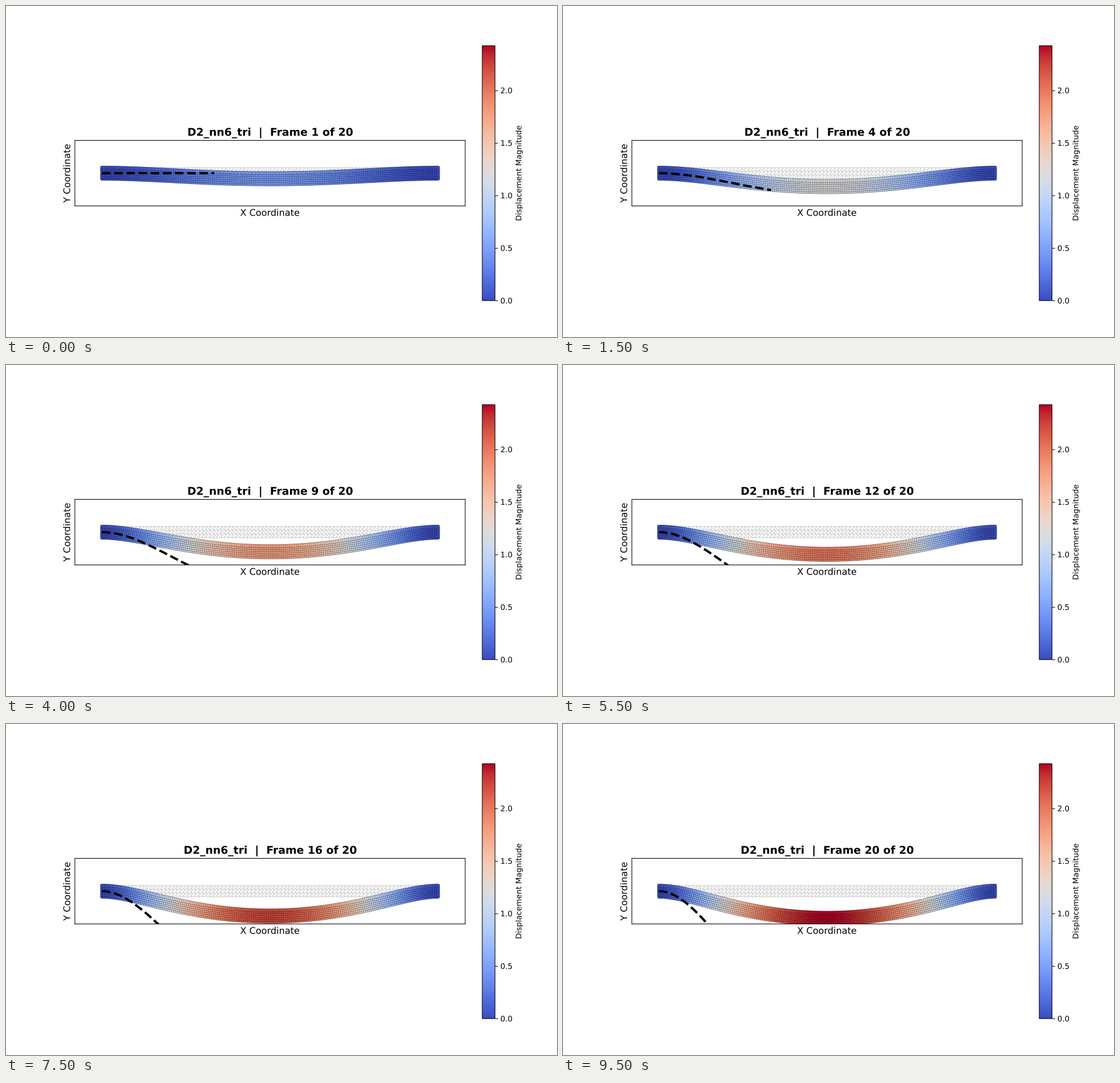
Recreate the animation shown at these times as a matplotlib script. Size 966 by 580 pixels, loop 10000 ms.

```python
import numpy as np
import matplotlib.pyplot as plt
from matplotlib.animation import FuncAnimation
from matplotlib.patheffects import Normal
from matplotlib.text import Text

# Unsnapped lines keep their fractional pixel positions.
plt.rcParams.update({"font.family": "DejaVu Sans", "path.snap": False})

WIDTH, HEIGHT, DPI = 966, 580, 96.6
STEPS, INTERVAL = 20, 500
LENGTH, DEPTH = 30.0, 1.0
CELLS_X, CELLS_Y = 90, 3
MAX_DISP = 2.425


def mid_deflection(step):
    """Mid-span deflection of a stiffening beam: w + a w^3 grows with load."""
    w = np.linspace(0, 3, 3001)
    load = w + 0.644 * w**3
    full = MAX_DISP + 0.644 * MAX_DISP**3
    return np.interp(full * step / STEPS, load, w)


def beam_shape(s, tension):
    """Clamped beam under uniform load and axial tension: value and slope."""
    def raw(p):
        bend = np.cosh(tension / 2) - np.cosh(tension * (p - 0.5))
        return p * (1 - p) / 2 - bend / (2 * tension * np.sinh(tension / 2))

    slope = 0.5 - s + np.sinh(tension * (s - 0.5)) / (2 * np.sinh(tension / 2))
    peak = raw(0.5)
    return raw(s) / peak, slope / peak


def displacement(step):
    w_mid = mid_deflection(step)
    columns = node_x[0]
    shape, slope = beam_shape(columns / LENGTH, 5.5 * w_mid)
    angle = w_mid * slope / LENGTH
    # Uniform stretch along the beam makes steep parts slide towards the ends.
    shortening = angle**2 / 2
    slide = np.cumsum(shortening.mean() - shortening) * columns[1]
    dx = slide + (node_y - DEPTH / 2) * angle
    dy = np.broadcast_to(-w_mid * shape, dx.shape)
    return dx, dy


def linear_curve(step):
    s = line_x / LENGTH
    return DEPTH / 2 - 0.633 * step * 16 * s**2 * (1 - s)**2


def cell_triangles():
    i, j = np.meshgrid(np.arange(CELLS_X), np.arange(CELLS_Y))
    low = (j * (CELLS_X + 1) + i).ravel()
    high = low + CELLS_X + 1
    return np.vstack([np.column_stack([low, low + 1, high]),
                      np.column_stack([low + 1, high + 1, high])])


def grid(nx, ny):
    return np.meshgrid(np.linspace(0, LENGTH, nx), np.linspace(0, DEPTH, ny))


node_x, node_y = grid(2 * CELLS_X + 1, 2 * CELLS_Y + 1)
corner_x, corner_y = grid(CELLS_X + 1, CELLS_Y + 1)
line_x = np.linspace(0, 10, 100)

fig, ax = plt.subplots(
    figsize=((WIDTH + 0.01) / DPI, (HEIGHT + 0.01) / DPI), dpi=DPI)
ax.triplot(corner_x.ravel(), corner_y.ravel(), cell_triangles(),
           color="lightgray", linewidth=0.8, zorder=1)
nodes = ax.scatter(node_x, node_y, c=np.zeros(node_x.size), s=20,
                   cmap="coolwarm", vmin=0, vmax=MAX_DISP,
                   edgecolors="black", linewidths=0.25, zorder=2)
curve, = ax.plot(line_x, linear_curve(0), "k--", linewidth=3, zorder=3)

ax.set_xlim(-MAX_DISP, LENGTH + MAX_DISP)
ax.set_ylim(-MAX_DISP, DEPTH + MAX_DISP)
ax.set_aspect("equal")
ax.set_xticks([])
ax.set_yticks([])
ax.set_xlabel("X Coordinate", fontsize=12)
ax.set_ylabel("Y Coordinate", fontsize=12)
title = ax.set_title("", fontsize=14, fontweight="bold")
bar = fig.colorbar(nodes, ax=ax, fraction=0.046, pad=0.04,
                   label="Displacement Magnitude")

# Drawing text as outlines gives smooth, unhinted letters.
for text in fig.findobj(Text) + bar.ax.get_yticklabels():
    text.set_path_effects([Normal()])


def update(frame):
    dx, dy = displacement(frame + 1)
    nodes.set_offsets(np.column_stack([(node_x + dx).ravel(),
                                       (node_y + dy).ravel()]))
    nodes.set_array(np.hypot(dx, dy).ravel())
    curve.set_ydata(linear_curve(frame))
    title.set_text(f"D2_nn6_tri  |  Frame {frame + 1} of {STEPS}")
    return nodes, curve, title


anim = FuncAnimation(fig, update, frames=STEPS, interval=INTERVAL,
                     init_func=lambda: update(0), repeat=True, repeat_delay=0)
plt.show()
```
